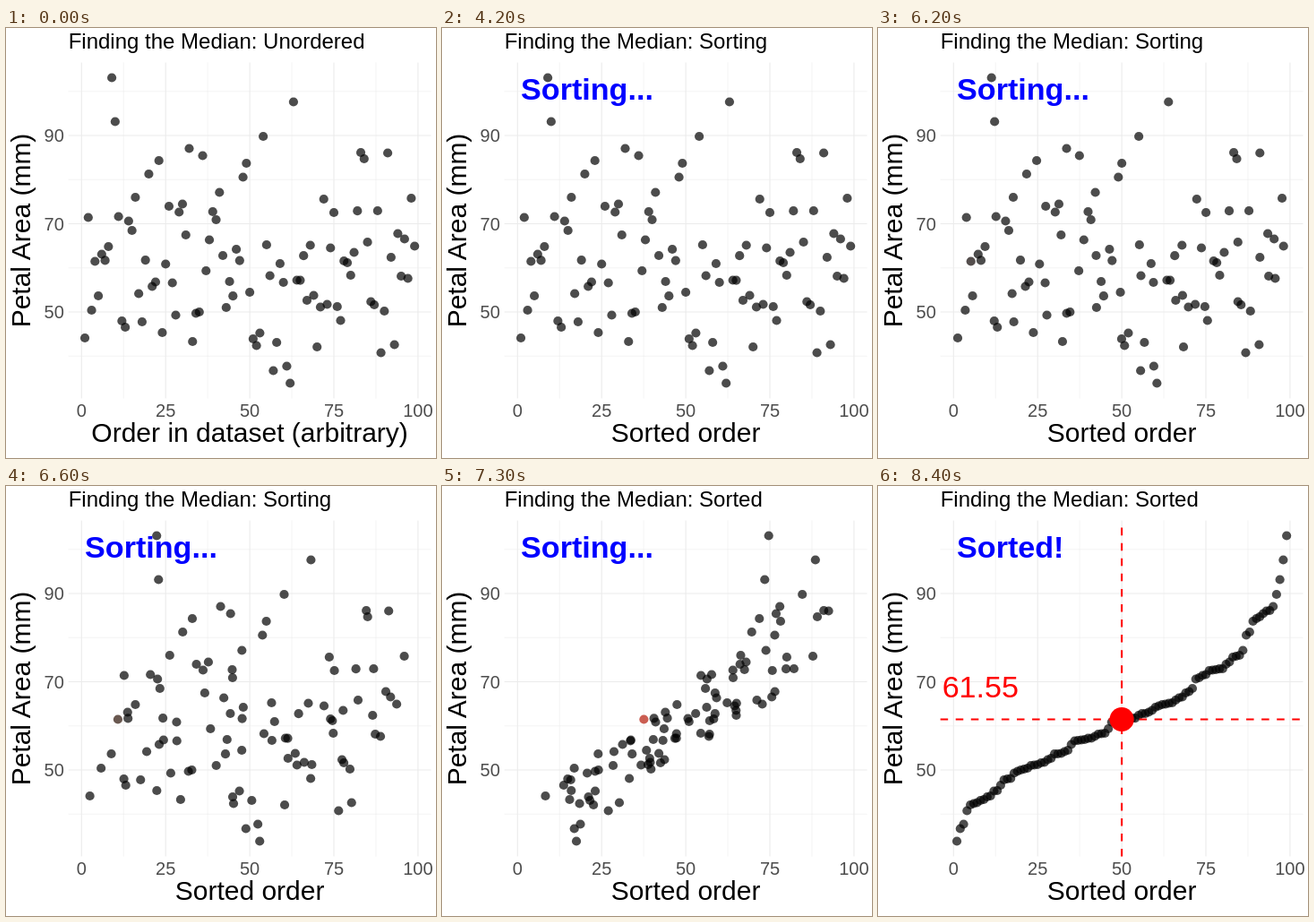
An HTML page that plays this animation: 480 by 480 pixels, repeating every 10000 ms.

```html
<!DOCTYPE html>
<html lang="en">
<head>
<meta charset="utf-8">
<title>Finding the Median</title>
<style>
  html, body { margin: 0; width: 100%; height: 100%; overflow: hidden; background: #fff; }
  svg { display: block; width: 100%; height: 100%; font-family: "Liberation Sans", Arial, Helvetica, sans-serif; }
  .tick { font-size: 20px; fill: #4d4d4d; }
  .axis { font-size: 30px; text-anchor: middle; }
  .note { font-size: 34.14px; }
  .status { font-weight: bold; fill: #00f; }
</style>
</head>
<body>
<svg id="plot" viewBox="0 0 480 480"></svg>
<script>
const LOOP = 10000, STEP = 100;
const RELABEL = 2900, SORT_TEXT = 4200, MOVE = 5700, DONE = 8400;
const LEFT = 69.65, RIGHT = 474.5, TOP = 38.4, BOTTOM = 413.6;
const MID = 50;

// Vertical pixel position of each observation, in dataset order
const ys = [
  346, 211.5, 315, 260.5, 299, 252.5, 259.4, 244, 55.5, 104.5,
  210.5, 327, 334, 215.5, 226, 189, 296.5, 328, 259.1, 163,
  288.5, 283.5, 148, 340, 263.5, 199, 284.5, 320.5, 205.5, 196.5,
  231, 134.5, 350, 318.5, 317, 142.5, 271, 236.5, 205, 214,
  183.5, 254, 312, 283, 299.2, 247, 259.6, 166.5, 151, 295,
  347, 354.5, 340.5, 121, 242, 276.5, 382.5, 351, 263, 284,
  377.5, 396.5, 82.5, 281.5, 281.6, 254.2, 304, 242.5, 298.5, 356,
  311.5, 191, 308.5, 245.5, 206, 311, 326.5, 260, 262, 276,
  250.5, 204.2, 139, 146, 239, 305.5, 309, 204, 362.5, 316,
  139.5, 256, 353.5, 229.5, 277, 235.5, 279.5, 190, 243.5
];

const px = v => 84.3 + 3.756 * v;
const py = v => 563.25 - 4.925 * v;

const plot = document.getElementById("plot");
function add(tag, attrs, text = "", parent = plot) {
  const el = document.createElementNS("http://www.w3.org/2000/svg", tag);
  for (const k in attrs) el.setAttribute(k, attrs[k]);
  el.textContent = text;
  parent.appendChild(el);
  return el;
}
const vline = (x, style, parent) =>
  add("line", { x1: x, x2: x, y1: BOTTOM, y2: TOP, ...style }, "", parent);
const hline = (y, style, parent) =>
  add("line", { x1: LEFT, x2: RIGHT, y1: y, y2: y, ...style }, "", parent);

// Grid and tick labels
const minor = { stroke: "#ebebeb", "stroke-width": 0.53 };
const major = { stroke: "#ebebeb", "stroke-width": 1.07 };
for (let v = 40; v <= 100; v += 20) hline(py(v), minor);
for (let v = 12.5; v < 100; v += 25) vline(px(v), minor);
for (let v = 50; v <= 90; v += 20) {
  hline(py(v), major);
  add("text", { class: "tick", x: 64.8, y: py(v) + 7.2, "text-anchor": "end" }, v);
}
for (let v = 0; v <= 100; v += 25) {
  vline(px(v), major);
  add("text", { class: "tick", x: px(v), y: 434, "text-anchor": "middle" }, v);
}

// Points
const order = ys.map((y, i) => i).sort((a, b) => ys[b] - ys[a]);
const rank = [];
order.forEach((i, k) => rank[i] = k + 1);
const dots = ys.map(y => add("circle", { cy: y, r: 5.1, "fill-opacity": 0.7 }));
const medianDot = dots[order[MID - 1]];

// Median markers
const result = add("g", {});
const dash = { stroke: "#f00", "stroke-width": 2.13, "stroke-dasharray": 8.535 };
const medianY = ys[order[MID - 1]];
vline(px(MID), dash, result);
hline(medianY, dash, result);
add("circle", { cx: px(MID), cy: medianY, r: 13.6, fill: "#f00" }, "", result);
add("text", { class: "note", x: px(8), y: 236, fill: "#f00", "text-anchor": "middle" }, "61.55", result);

// Titles
const status = add("text", { class: "note status", x: px(1), y: 80.4 });
const title = add("text", { x: LEFT, y: 23, "font-size": 24 });
const xTitle = add("text", { class: "axis", x: px(50), y: 462.3 });
add("text", { class: "axis", transform: "translate(27 226) rotate(-90)" }, "Petal Area (mm)");

const ease = u => u < 0.5 ? 4 * u ** 3 : 1 - 4 * (1 - u) ** 3;

function draw(t) {
  const u = Math.min(1, Math.max(0, (t - MOVE) / (DONE - MOVE)));
  const p = ease(u);
  dots.forEach((dot, i) => {
    const from = i + 1;
    dot.setAttribute("cx", px(from + (rank[i] - from) * p));
  });
  medianDot.style.fill = `lab(${54.3 * p} ${80.8 * p} ${69.9 * p})`;

  const stage = t < RELABEL ? "Unordered" : u < 0.5 ? "Sorting" : "Sorted";
  title.textContent = "Finding the Median: " + stage;
  xTitle.textContent = t < RELABEL ? "Order in dataset (arbitrary)" : "Sorted order";
  status.textContent = t < SORT_TEXT ? "" : t < DONE ? "Sorting..." : "Sorted!";
  result.style.display = t < DONE ? "none" : "";
}

const start = performance.now();
let shown = 0;
draw(0);
function tick() {
  const elapsed = Math.max(0, performance.now() - start);
  const t = Math.floor(elapsed % LOOP / STEP) * STEP;
  if (t !== shown) draw(shown = t);
  requestAnimationFrame(tick);
}
requestAnimationFrame(tick);
</script>
</body>
</html>
```
